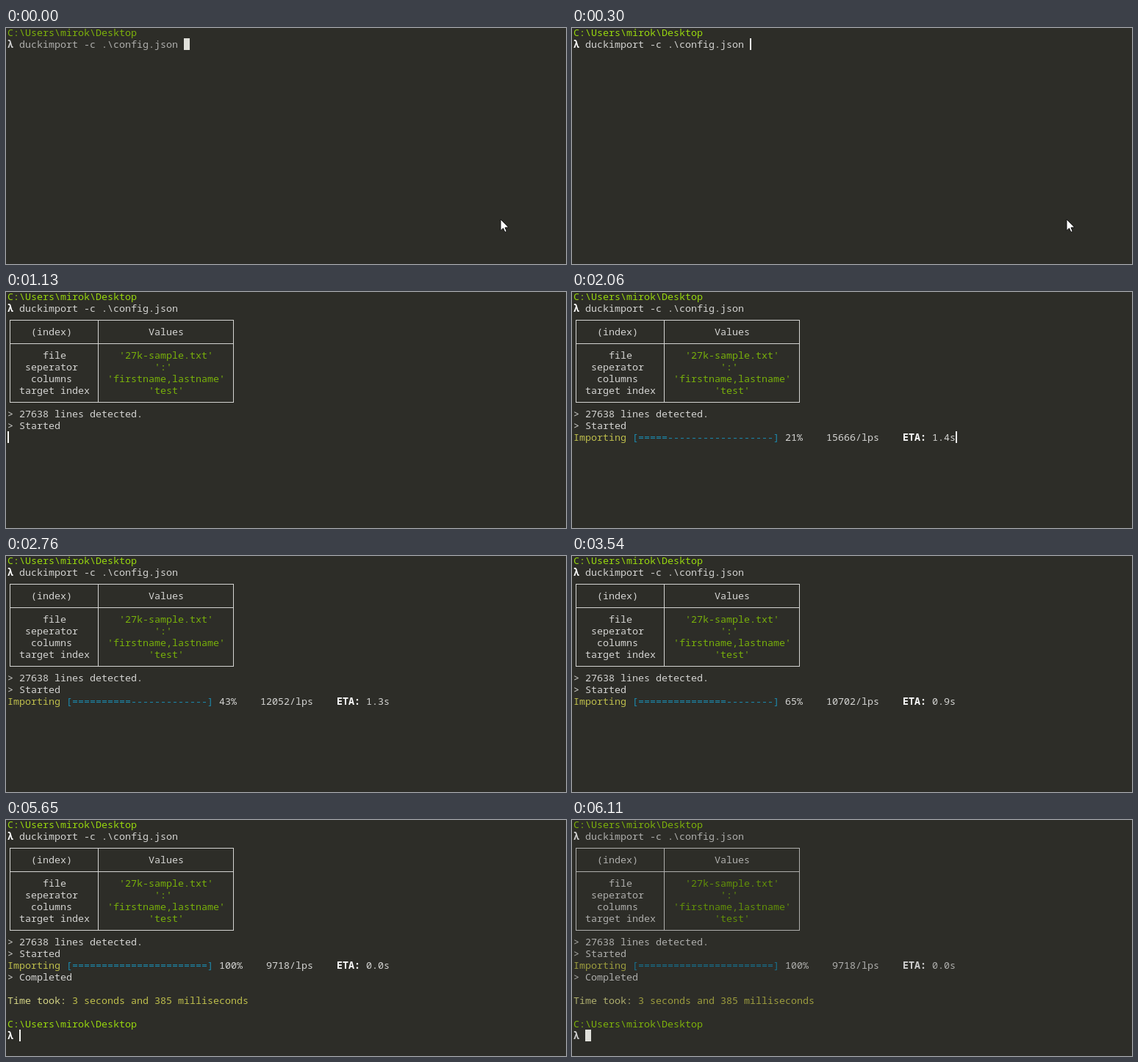
Animation, 762 px wide and 322 px high, one loop 6190 ms. Source, as an HTML page with a canvas:

```html
<!DOCTYPE html>
<html lang="en">
<head>
<meta charset="utf-8">
<title>Terminal import</title>
<style>
  html, body { margin: 0; width: 100%; height: 100%; overflow: hidden; background: #2d2d28; }
  canvas { display: block; }
</style>
</head>
<body>
<canvas id="stage" width="762" height="322"></canvas>
<script>
const ctx = document.getElementById('stage').getContext('2d');
const CELL = 8, ROW = 16, LEFT = 2;
const LINES = 27638, BAR = 23;

// Moments of the session, in ms
const AT = { focus: 70, enter: 440, move: 670, hide: 820, table: 900,
             count: 1130, bar: 1680, done: 4550, blur: 6110, loop: 6190 };
const UPDATE = 348, BLINK = 542;

const COLORS = {
  text: [212, 212, 210],
  white: [255, 255, 255],
  path: [152, 216, 14],
  green: [120, 176, 10],
  blue: [28, 138, 174],
  yellow: [190, 190, 76],
  pale: [212, 212, 134]
};
const ARROW = new Path2D('M.5 .5V16L4 12.7L6.4 18L8.8 17L6.5 11.8L11.3 11.5Z');

let focused = true;

function paint(name) {
  const k = focused ? 1 : 0.82;
  ctx.fillStyle = `rgb(${COLORS[name].map(v => Math.round(v * k))})`;
}

function put(col, row, text, color = 'text') {
  const weight = color === 'white' ? 700 : 500;
  ctx.font = `${weight} 13.3333px "Noto Sans Mono", "DejaVu Sans Mono", monospace`;
  paint(color);
  ctx.fillText(text, LEFT + col * CELL, row * ROW + 11);
}

function prompt(row) {
  put(0, row, 'C:\\Users\\mirok\\Desktop', 'path');
  put(0, row + 1, 'λ', 'white');
}

function tableRow(row, key, value, color) {
  const center = (col, width, text, tint) =>
    put(col + Math.floor((width - text.length) / 2), row, text, tint);
  center(1, 14, key);
  center(16, 22, value, color);
}

function table() {
  paint('text');
  for (const y of [38, 70, 150]) ctx.fillRect(5, y, 305, 1);
  for (const x of [5, 125, 309]) ctx.fillRect(x, 38, 1, 113);
  tableRow(3, '(index)', 'Values');
  tableRow(5, 'file', "'27k-sample.txt'", 'green');
  tableRow(6, 'seperator', "':'", 'green');
  tableRow(7, 'columns', "'firstname,lastname'", 'green');
  tableRow(8, 'target index', "'test'", 'green');
}

function progress(t) {
  const step = Math.floor((t - AT.bar) / UPDATE);
  const part = t < AT.done ? (10 + 11 * step) / 100 : 1;
  const done = Math.round(part * BAR);
  // the rate settles as the import goes on
  const rate = Math.round(7743.8 + 2077.3 / (part + 0.0522));
  const eta = LINES * (1 - part) / rate;
  const pct = `${Math.round(part * 100)}%`;

  put(0, 12, 'Importing', 'yellow');
  put(10, 12, `[${'='.repeat(done)}${'-'.repeat(BAR - done)}]`, 'blue');
  put(36, 12, pct + `${rate}/lps`.padStart(16 - pct.length));
  put(56, 12, 'ETA:', 'white');
  put(61, 12, `${eta.toFixed(1)}s`);
}

function summary() {
  put(0, 13, '> Completed');
  put(0, 15, 'Time took:', 'pale');
  put(11, 15, '3 seconds and 385 milliseconds', 'yellow');
  prompt(17);
}

function cursorCell(t) {
  if (t < AT.enter) return [30, 1];
  if (t < AT.table) return [0, 2];
  if (t < AT.count) return [0, 11];
  if (t < AT.bar) return [0, 12];
  if (t < AT.done) return [65, 12];
  return [2, 18];
}

function cursor(t) {
  const since = t < AT.done ? AT.bar + 230 : AT.done;
  const hidden = Math.floor(Math.max(0, t - since) / BLINK) % 2;
  if (focused && hidden) return;
  const [col, row] = cursorCell(t);
  ctx.fillStyle = focused ? '#f6f6f2' : '#e0e0da';
  ctx.fillRect(LEFT + col * CELL, row * ROW - 2, focused ? 2 : CELL, ROW);
}

function pointer(t) {
  if (t >= AT.hide) return;
  const slide = Math.min(1, Math.max(0, (t - AT.move) / 80));
  ctx.save();
  ctx.translate(Math.round(673 + 28 * slide) - 0.5, Math.round(261 + 4 * slide) - 0.5);
  ctx.fillStyle = '#fff';
  ctx.strokeStyle = '#111';
  ctx.fill(ARROW);
  ctx.stroke(ARROW);
  ctx.restore();
}

function draw(t) {
  focused = t >= AT.focus && t < AT.blur;
  ctx.fillStyle = '#2d2d28';
  ctx.fillRect(0, 0, 762, 322);

  prompt(0);
  put(2, 1, 'duckimport -c .\\config.json');
  if (t >= AT.table) {
    table();
    put(0, 10, t < AT.count ? '> Calculating number of lines...' : `> ${LINES} lines detected.`);
  }
  if (t >= AT.count) put(0, 11, '> Started');
  if (t >= AT.bar) progress(t);
  if (t >= AT.done) summary();
  cursor(t);
  pointer(t);
}

const start = performance.now();
function tick() {
  draw((performance.now() - start) % AT.loop);
  requestAnimationFrame(tick);
}
tick();
</script>
</body>
</html>
```
